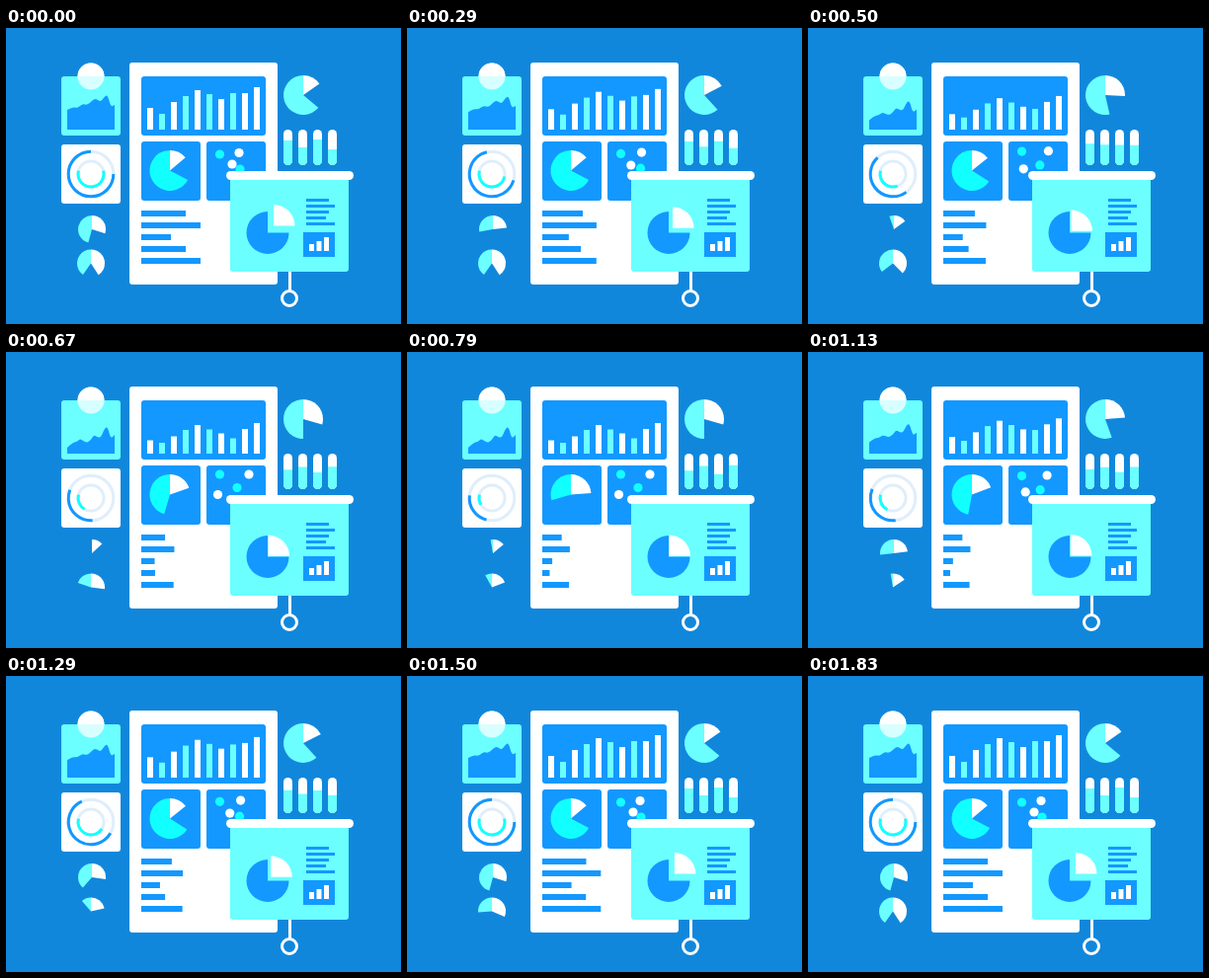
An HTML page with a canvas for the animation above (1870 ms loop, 400 px wide and 300 px high).

```html
<!DOCTYPE html>
<html lang="en">
<head>
<meta charset="utf-8">
<title>Dashboard</title>
<style>
html, body { margin: 0; width: 100%; height: 100%; overflow: hidden; background: #1187dc; }
canvas { display: block; width: 400px; height: 300px; }
</style>
</head>
<body>
<canvas id="stage"></canvas>
<script>
const LOOP = 1870;
const BG = '#1187dc', BLUE = '#1398ff', CYAN = '#6bffff', AQUA = '#12ffff', WHITE = '#fff', TRACK = '#dfeefb';

const canvas = document.getElementById('stage');
const ctx = canvas.getContext('2d');
const dpr = window.devicePixelRatio || 1;
canvas.width = 400 * dpr;
canvas.height = 300 * dpr;
ctx.scale(dpr, dpr);

const mix = (a, b, p) => a + (b - a) * p;

function ease(t, from, to) {
  const x = Math.min(1, Math.max(0, (t - from) / (to - from)));
  return x * x * (3 - 2 * x);
}

// Goes 0 to 1 between a and b, then back to 0 between c and d.
const swing = (t, a, b, c, d) => ease(t, a, b) - ease(t, c, d);

function box(x, y, w, h, color, r = 0) {
  ctx.fillStyle = color;
  ctx.beginPath();
  ctx.roundRect(x, y, w, h, r);
  ctx.fill();
}

function dot(x, y, r, color) {
  ctx.fillStyle = color;
  ctx.beginPath();
  ctx.arc(x, y, r, 0, Math.PI * 2);
  ctx.fill();
}

// Angles are degrees clockwise from the top.
const rad = deg => (deg - 90) * Math.PI / 180;

function slice(x, y, r, from, to, color) {
  if (to - from < 0.5) return;
  ctx.fillStyle = color;
  ctx.beginPath();
  ctx.moveTo(x, y);
  ctx.arc(x, y, r, rad(from), rad(to));
  ctx.fill();
}

function ring(x, y, r, from, to, color, width = 3) {
  ctx.strokeStyle = color;
  ctx.lineWidth = width;
  ctx.beginPath();
  ctx.arc(x, y, r, rad(from), rad(to));
  ctx.stroke();
}

function pie(x, y, r, cyanFrom, whiteTo, color = CYAN) {
  slice(x, y, r, cyanFrom, 360, color);
  slice(x, y, r, 0, whiteTo, WHITE);
}

const areaX = [62, 67, 72, 75, 78, 82, 86, 89, 92, 96, 100, 103, 106, 110];
const areaHigh = [83, 80, 81, 79, 77, 78, 75, 72, 72, 75, 69, 68, 80, 78];
const areaLow = [97, 92, 91, 88, 90, 92, 89, 84, 86, 87, 77, 76, 88, 84];

function areaCard(p) {
  box(56, 49, 60, 60, CYAN, 3);
  dot(86, 49, 13.5, '#d8ffff');
  slice(86, 49, 13.5, -90, 90, WHITE);
  const pts = areaX.map((x, i) => [x, mix(areaHigh[i], areaLow[i], p)]);
  ctx.fillStyle = BLUE;
  ctx.beginPath();
  ctx.moveTo(62, 103);
  ctx.lineTo(...pts[0]);
  for (let i = 1; i < pts.length - 1; i++) {
    const [x, y] = pts[i], [nx, ny] = pts[i + 1];
    ctx.quadraticCurveTo(x, y, (x + nx) / 2, (y + ny) / 2);
  }
  ctx.lineTo(...pts[pts.length - 1]);
  ctx.lineTo(110, 103);
  ctx.fill();
}

function ringCard(p) {
  box(56, 118, 60, 60, WHITE, 3);
  ring(86, 148, 22.8, 0, 360, TRACK);
  ring(86, 148, 13, 0, 360, TRACK);
  ring(86, 148, 22.8, mix(90, 205, p), mix(360, 268, p), BLUE);
  ring(86, 148, 13, mix(75, 255, p), 285, AQUA);
}

const barHigh = [81, 87, 75, 69, 63, 67, 72, 66, 66, 60];
const barLow = [89.5, 92, 85.5, 79, 74, 78.5, 82.5, 87.5, 78, 72];
const lineLong = [45, 60, 30, 45, 60];
const lineShort = [17, 24.5, 8, 3.5, 23.5];

function report(bars, wedge, dots, lines) {
  box(125, 35, 150, 225, WHITE, 3);
  box(137, 49, 126, 60, BLUE, 3);
  barHigh.forEach((high, i) => {
    const y = mix(high, barLow[i], bars);
    box(143 + i * 12, y, 6, 103 - y, i % 2 && i < 9 ? CYAN : WHITE);
  });

  box(137, 115, 60, 60, BLUE, 3);
  pie(166, 144.5, 20.5, mix(118, 270, wedge), mix(50, 90, wedge), AQUA);

  box(203, 115, 60, 60, BLUE, 3);
  dot(216.5, mix(128, 124, dots), 4.6, AQUA);
  dot(mix(236, 246, dots), mix(126.5, 124, dots), 4.6, WHITE);
  dot(mix(229, 214.5, dots), mix(138, 144.5, dots), 4.6, WHITE);
  dot(mix(237, 234, dots), mix(143, 137.5, dots), 4.6, AQUA);

  lineLong.forEach((w, i) => box(137, 185 + i * 12, mix(w, lineShort[i], lines), 6, BLUE));
}

const tubeA = [114, 121, 113, 123];
const tubeB = [121, 115, 125, 114];

function tubes(p) {
  tubeA.forEach((level, i) => {
    const x = 281 + i * 15, y = mix(level, tubeB[i], p);
    box(x, 103, 9, 36, WHITE, 4.5);
    box(x, y, 9, 139 - y, CYAN, [0, 0, 4.5, 4.5]);
  });
}

function board(p) {
  box(286, 246, 3, 20, WHITE);
  ring(287, 274, 7.5, 0, 360, WHITE);
  box(227, 150, 120, 97, CYAN, 3);
  box(223, 145, 129, 9, WHITE, 4.5);
  slice(265, 207.5, 21.5, 90, 360, BLUE);
  slice(mix(271, 265.5, p), mix(200.5, 207, p), 21.5, 0, 90, WHITE);
  [23, 29, 23, 20, 29].forEach((w, i) => box(304, 173 + i * 6, w, 3, BLUE));
  box(301, 207, 32, 25, BLUE);
  [7, 10, 14].forEach((h, i) => box(307 + i * 7.5, 226 - h, 5, h, WHITE));
}

function draw(t) {
  const quick = swing(t, 167, 667, 917, 1417);
  const wedge = swing(t, 458, 875, 917, 1333);
  const slow = swing(t, 83, 958, 1042, 1542);
  const arcs = swing(t, 83, 958, 958, 1458);
  const pull = swing(t, 42, 667, 1042, 1542);
  const upper = swing(t, 42, 625, 667, 1500);
  const lower = swing(t, 375, 958, 1000, 1833);

  ctx.fillStyle = BG;
  ctx.fillRect(0, 0, 400, 300);
  areaCard(quick);
  ringCard(arcs);
  pie(87, 204, 14, mix(195, 360, upper), mix(108, 47, upper));
  pie(86, 238.5, 14, mix(215, 360, lower), mix(147, 50, lower));
  report(quick, wedge, quick, slow);
  pie(301, 68, 20, mix(130, 180, quick), mix(55, 106, quick));
  tubes(arcs);
  board(pull);
}

function tick() {
  draw(performance.now() % LOOP);
  requestAnimationFrame(tick);
}
tick();
</script>
</body>
</html>
```
